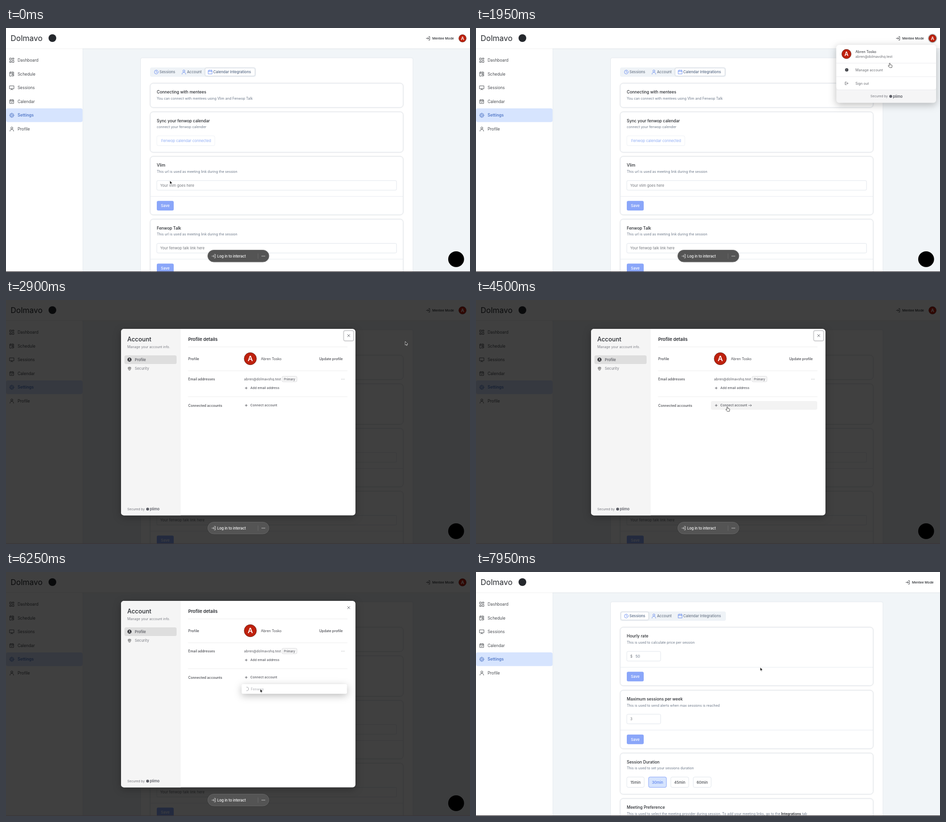
An HTML page that plays this animation: 960 px wide and 507 px high, repeating every 8000 ms.

```html
<!DOCTYPE html>
<html lang="en">
<head>
<meta charset="utf-8">
<title>Settings walkthrough</title>
<style>
html, body { margin: 0; width: 100%; height: 100%; overflow: hidden; background: #fff; }
svg { display: block; width: 100vw; height: 100vh; font-family: Inter, sans-serif; }
.shadow { filter: drop-shadow(0 .8px .8px #0002); }
.float { filter: drop-shadow(0 4px 8px #0004); }
</style>
</head>
<body>
<svg id="stage" viewBox="0 0 960 507"></svg>
<script>
const LOOP = 8000;
const INK = '#25282d', MUTED = '#6b7788', BLUE = '#5b82ee', LINE = '#e1e6ec', BUTTON = '#8aa6f9', PALE = '#d6e4fe';

// Drawing helpers; text is placed by its vertical centre.
const text = (x, y, str, size = 7.1, fill = MUTED, weight = 400, extra = '') =>
  `<text x="${x}" y="${y + size * .36}" font-size="${size}" fill="${fill}" font-weight="${weight}" ${extra}>${str}</text>`;
const rect = (x, y, w, h, fill, rx = 0, stroke = 'none', extra = '') =>
  `<rect x="${x}" y="${y}" width="${w}" height="${h}" rx="${rx}" fill="${fill}" stroke="${stroke}" ${extra}/>`;
const circle = (x, y, r, fill, stroke = 'none', sw = 1) =>
  `<circle cx="${x}" cy="${y}" r="${r}" fill="${fill}" stroke="${stroke}" stroke-width="${sw}"/>`;
const icon = (x, y, d, color, sw = .9) =>
  `<path transform="translate(${x} ${y})" d="${d}" fill="none" stroke="${color}" stroke-width="${sw}" stroke-linecap="round" stroke-linejoin="round"/>`;
const rule = (x1, x2, y, color = LINE) => icon(0, 0, `M${x1} ${y}H${x2}`, color, .8);
const group = (id, body, extra = '') => `<g id="${id}" ${extra}>${body}</g>`;
const dots = (x, y, color) => [-2.6, 0, 2.6].map(dx => circle(x + dx, y, .75, color)).join('');

// Icon outlines, centred on the origin.
const ICON = {
  grid: 'M-4-4.5h3v4h-3zM1.3-4.5h3v2.6h-3zM1.3.5h3v4h-3zM-4 2h3v2.5h-3z',
  schedule: 'M-4.2-3.5h8.2v3M-4.2-3.5v8h3M-4.2-1.3h7M-2-5v2M2-5v2M4.3 2.3a2.3 2.3 0 1 1-4.6 0a2.3 2.3 0 1 1 4.6 0M2 1v1.5h1',
  board: 'M-4.4-4h8.8v6h-8.8zM0 2v1.5M-2 4.5l2-1.5l2 1.5',
  calendar: 'M-3.8-3.3h7.6v7.3h-7.6zM-3.8-1.1h7.6M-1.9-4.6v2M1.9-4.6v2',
  check: 'M-1.5 1.3l1.1 1.1l2-2.1',
  gear: 'M2 0a2 2 0 1 1-4 0a2 2 0 1 1 4 0M4 0a4 4 0 1 1-8 0a4 4 0 1 1 8 0M0-4.8v1M0 3.8v1M-4.8 0h1M3.8 0h1M-3.4-3.4l.7.7M2.7 2.7l.7.7M-3.4 3.4l.7-.7M2.7-2.7l.7-.7',
  person: 'M2.1-2.2a2.1 2.1 0 1 1-4.2 0a2.1 2.1 0 1 1 4.2 0M-3.8 4.4a3.8 3.8 0 0 1 7.6 0',
  clock: 'M4 0a4 4 0 1 1-8 0a4 4 0 1 1 8 0M0-2.4v2.6l1.7.8',
  login: 'M-4 0h5M-.8-2l2 2l-2 2M1-3.7h2.2v7.4h-2.2',
  logout: 'M0-2.8h-2.7v5.6h2.7M-.8 0h4M1.8-1.5l1.5 1.5l-1.5 1.5',
  plus: 'M-2.2 0h4.4M0-2.2v4.4',
  cross: 'M-2.5-2.5l5 5M2.5-2.5l-5 5',
  arrow: 'M-3 0h6M1-2l2 2l-2 2',
  spinner: 'M0-3.8a3.8 3.8 0 0 1 0 7.6'
};

const avatar = (x, y, r) => circle(x, y, r - .3, '#bf210d', '#4d120b', .7) +
  text(x, y, 'A', r * 1.15, '#fff', 600, 'text-anchor="middle"');
const modeLink = x => icon(x, 21.5, ICON.login, INK, .8) + text(x + 8.5, 21.5, 'Mentee Mode', 6.8, INK, 500);
const card = (y, h, title, sub) => rect(298.5, y, 523, h, '#fff', 6, LINE, 'class="shadow"') +
  text(312, y + 18, title, 8.4, INK, 500) + text(312, y + 31, sub);
const input = (y, w, label) => rect(312, y, w, 20, '#fff', 2.5, LINE) + text(319, y + 10, label, 7.5, '#74777d');
const save = y => rule(298.5, 821.5, y) + rect(312, y + 9.3, 35, 20, BUTTON, 3) +
  text(329.5, y + 19.3, 'Save', 7.6, '#fff', 500, 'text-anchor="middle"');

function tabs(active) {
  const list = [['Sessions', 300, 57, 'clock'], ['Account', 358, 52, 'person'], ['Calendar Integrations', 412, 103, 'calendar']];
  return rect(298, 82, 219, 19.5, '#eff3f7', 4) + list.map(([label, x, w, name], i) =>
    (i === active ? rect(x, 83.2, w, 16.3, '#fff', 3, '#dce2e9', 'class="shadow"') : '') +
    icon([311, 368, 422.5][i], 91.5, ICON[name], BLUE, .8) +
    text([317.5, 374.5, 428.8][i], 91.5, label, 7.6, i === active ? '#536784' : MUTED, 500)).join('');
}

function shell() {
  const items = [['Dashboard', 'grid'], ['Schedule', 'schedule'], ['Sessions', 'board'], ['Calendar', 'calendar'], ['Settings', 'gear'], ['Profile', 'person']];
  return rect(0, 0, 960, 507, '#f1f5f8') + rect(0, 42, 159, 465, '#fff') +
    icon(0, 0, 'M159 43V507', '#e6eaee') + rect(0, 0, 960, 42.5, '#fff', 0, 'none', 'class="shadow"') +
    text(9.5, 21, 'Dolmavo', 16, INK) + circle(96, 21, 8, INK) +
    items.map(([label, name], i) => {
      const y = 67 + i * 28.6, on = i === 4, color = on ? '#5379c8' : '#484b50';
      return (on ? rect(0, 167, 158.5, 28.5, PALE, 4) : '') + icon(12, y, ICON[name], color) +
        (name === 'calendar' ? icon(12, y, ICON.check, color) : '') + text(24, y, label, 8.4, color, on ? 600 : 400);
    }).join('') + rect(278.5, 62, 563.5, 460, '#fff', 3, '#e5e9ee');
}

const integrations = tabs(2) +
  card(115, 50, 'Connecting with mentees', 'You can connect with mentees using Vlim and Fenwop Talk') +
  card(174.5, 83.5, 'Sync your fenwop calendar', 'connect your fenwop calender') +
  rect(312, 224, 120, 20.5, '#fff', 3, '#eef1f6') + text(321, 234.5, 'Fenwop calendar connected', 7.7, '#8fadf5') +
  card(267, 121, 'Vlim', 'This url is used as meeting link during the session') + input(317, 496, 'Your vlim goes here') + save(350) +
  card(397.5, 121, 'Fenwop Talk', 'This url is used as meeting link during the session') + input(447.5, 496, 'Your fenwop talk link here') + save(480.3);

const durations = [['15min', 312, 36], ['30min', 357, 37], ['45min', 403, 37], ['60min', 449.5, 37]].map(([label, x, w], i) =>
  rect(x, 426, w, 21.5, i === 1 ? PALE : '#fff', 3, i === 1 ? BUTTON : LINE) +
  text(x + w / 2, 437, label, 7.7, i === 1 ? BLUE : '#484b50', 500, 'text-anchor="middle"')).join('');

const sessions = tabs(0) +
  card(115, 121, 'Hourly rate', 'This is used to calculate price per session') + input(165, 70, '$') + text(330, 175, '50', 7.5) + save(198) +
  card(246, 121, 'Maximum sessions per week', 'This is used to send alerts when max sessions is reached') + input(295.5, 70, '3') + save(328.5) +
  card(376.5, 85, 'Session Duration', 'This is used to set your sessions duration') + durations +
  card(471, 70, 'Meeting Preference', 'This is used to select the meeting provider during session. To add your meeting links, go to the <tspan font-weight="600" fill="#25282d">Integrations</tspan> tab');

const secured = (x, y) => text(x, y, 'Secured by', 6.7, '#73757c') + circle(x + 42, y, 3, '#5c5e66') + text(x + 46.5, y, 'plimo', 7.6, '#5c5e66', 600);
const NAME = 'Abren Tosko', EMAIL = 'abren@dolmavohq.test';

const userMenu = rect(745.5, 35, 206.5, 120.5, '#f5f5f6', 6, 'none', 'class="float"') +
  rect(745.5, 35, 206.5, 93.5, '#fff', 6) + rule(745.5, 952, 73, '#e8e8ea') + rule(745.5, 952, 101, '#e8e8ea') + rule(745.5, 952, 128.5, '#e8e8ea') +
  avatar(766.5, 54, 10) + text(785, 49, NAME, 7.2, '#4e5056', 500) + text(785, 59, EMAIL, 7, '#6b6d73') +
  `<g transform="translate(767 87) scale(.65)">${icon(0, 0, ICON.gear, '#3c3e44', 2)}</g>` + text(785, 87, 'Manage account', 7.2, '#6b6d73') +
  icon(766.5, 115, ICON.logout, '#6b6d73') + text(785, 115, 'Sign out', 7.2, '#6b6d73') + secured(816, 142);

const action = (y, label) => icon(497, y, ICON.plus, '#505259') + text(505.5, y, label, 6.8, '#5a5c63', 500);
const modal = rect(238, 60, 485, 387.5, '#fff', 6, 'none', 'class="float"') +
  '<path d="M361.500 60H244a6 6 0 0 0-6 6V441.500a6 6 0 0 0 6 6H361.500z" fill="#f5f5f5"/>' +
  text(251, 82, 'Account', 12.4, INK, 500) + text(251, 97, 'Manage your account info.', 7, '#7c7e85') +
  rect(245, 115, 108, 18, '#dedede', 3.5) + circle(255.5, 124, 4.2, '#2c2d31') + circle(255.5, 122.8, 1.4, '#dedede') +
  icon(255.5, 124, 'M-2 2.3q2-1.800 4 0', '#dedede', 1) + text(266.5, 124, 'Profile', 7.4, '#505259', 500) +
  '<path d="M255.500 138.500l3.500 1.300v2.500q-.3 3-3.500 4.600q-3.200-1.600-3.500-4.600v-2.500z" fill="#999"/>' +
  icon(255.5, 142.5, ICON.check, '#f5f5f5', .8) + text(266.5, 142.5, 'Security', 7.4, '#8e9096', 500) + secured(251, 434.5) +
  text(377, 82, 'Profile details', 9.2, INK, 600) +
  [97.5, 147, 201].map(y => rule(377, 706, y, '#e9e9ea')).join('') +
  text(377, 122.5, 'Profile', 7.3, '#46484e', 500) + avatar(505.5, 122, 13) + text(527.5, 122.5, NAME, 7.2, '#46484e') +
  text(648, 122.5, 'Update profile', 7.2, '#46484e', 500) +
  text(377, 164.5, 'Email addresses', 7.1, '#46484e', 500) + text(492.5, 164.5, EMAIL, 7, '#5a5c63') +
  rect(571, 158.5, 31, 11.5, '#f6f6f6', 2.5, '#e0e0e2') + text(586.5, 164.5, 'Primary', 6.2, '#606269', 500, 'text-anchor="middle"') +
  dots(697, 164.5, '#b8b9bd') + action(183, 'Add email address') +
  text(377, 219, 'Connected accounts', 7.1, '#46484e', 500) +
  group('rowHover', rect(486, 210, 220, 18, '#f3f3f3', 3.5) + icon(567, 219, ICON.arrow, '#5a5c63', .8)) + action(219, 'Connect account') +
  group('closeRing', rect(698.5, 63.5, 21, 21.5, '#fff', 3.5, '#cfcfd1', 'stroke-width="2"')) + icon(709, 74, ICON.cross, '#606269') +
  group('providers', rect(487.5, 233, 218, 20, '#fff', 3, 'none', 'class="float"') +
    group('idle', rect(487.5, 233, 218, 20, '#f6f6f6', 3) + circle(498, 243, 3.6, '#5b82ee') + text(506.5, 243, 'Fenwop', 7.1, '#5a5c63', 500)) +
    group('busy', group('spinner', icon(0, 0, ICON.spinner, '#96979c')) + text(506.5, 243, 'Fenwop', 7.1, '#bbbcc0', 500)));

const toolbar = group('pill', rect(417.5, 461.5, 126.5, 24.5, '#545454', 12.2, '#646464', 'class="shadow"') +
  icon(430, 474, ICON.login, '#eee', .8) + text(437, 474, 'Log in to interact', 7.4, '#fff', 500) +
  icon(0, 0, 'M521.500 469V479', '#707070', .8) + dots(532.5, 474, '#fff')) + circle(931.3, 480.3, 16.4, '#000');

const stage = document.getElementById('stage');
stage.innerHTML = group('page', shell() +
    group('before', integrations + group('halo', circle(944.5, 21.5, 10, '#d7d7d7')) + modeLink(873.5) + avatar(944.5, 21.5, 8)) +
    group('after', sessions + modeLink(893.5))) +
  group('userMenu', userMenu) + group('shade', rect(0, 0, 960, 507, '#000')) + group('modal', modal) + group('toolbar', toolbar) +
  rect(0, 505.8, 960, 1.2, '#3a3538') +
  group('cursor',
    group('arrow', '<path d="M0 0V7.500L1.700 6L2.800 8.500L4 8L2.900 5.600H5.300Z" fill="#111" stroke="#fff" stroke-width=".7"/>') +
    group('hand', '<path d="M0 0q1 0 1 1v2.500l3 .5q1.200.3 1 1.600l-.7 3.700H-.3L-3.300 5.600q.6-1.200 2.300.2V1q0-1 1-1z" fill="#fff" stroke="#333" stroke-width=".8"/>'));

const parts = Object.fromEntries([...stage.querySelectorAll('[id]')].map(el => [el.id, el]));
const show = (id, on) => { parts[id].style.display = on ? '' : 'none'; };
const clamp = v => Math.min(1, Math.max(0, v));
const ease = v => v * v * (3 - 2 * v);

// Pointer stops: time, x, y.
const PATH = [[0, 339, 317], [350, 339, 317], [1250, 944, 21], [1700, 944, 21], [1950, 856, 73], [2300, 826, 87],
  [3100, 826, 86], [3950, 520, 222], [4950, 520, 222], [5400, 526, 243], [6800, 526, 243], [7600, 588, 198], [LOOP, 588, 198]];

function pointerAt(t) {
  const i = PATH.findIndex((p, k) => k && t <= p[0]);
  const [t0, x0, y0] = PATH[i - 1], [t1, x1, y1] = PATH[i];
  const k = ease((t - t0) / (t1 - t0));
  return [x0 + (x1 - x0) * k, y0 + (y1 - y0) * k];
}

function draw(t) {
  const within = (a, b) => t >= a && t < b;
  const left = t >= 6750, loaded = t >= 7250;
  show('page', !left || loaded);
  show('before', !left);
  show('after', loaded);
  show('toolbar', !left);
  show('halo', within(1500, 2600));
  show('userMenu', within(1550, 2600));

  const open = within(2600, 6750), fade = clamp((t - 2600) / 150);
  show('shade', open);
  show('modal', open);
  parts.shade.style.opacity = .75 * Math.pow(fade, .85);
  parts.modal.style.opacity = fade;
  parts.modal.setAttribute('transform', `translate(0 ${4.8 * (1 - fade)})`);
  show('rowHover', within(3850, 5200));
  show('closeRing', t < 5000);
  show('providers', t >= 5000);
  show('idle', t < 5900);
  show('busy', t >= 5900);
  parts.spinner.setAttribute('transform', `translate(498 243) rotate(${(t - 6250) * .45})`);

  const hand = within(1200, 1720) || within(1850, 2600) || within(3850, 5900);
  show('hand', hand);
  show('arrow', !hand);
  parts.cursor.setAttribute('transform', `translate(${pointerAt(t).join(' ')})`);
}

const start = performance.now();
function tick() {
  draw((performance.now() - start) % LOOP);
  requestAnimationFrame(tick);
}
tick();
</script>
</body>
</html>
```
